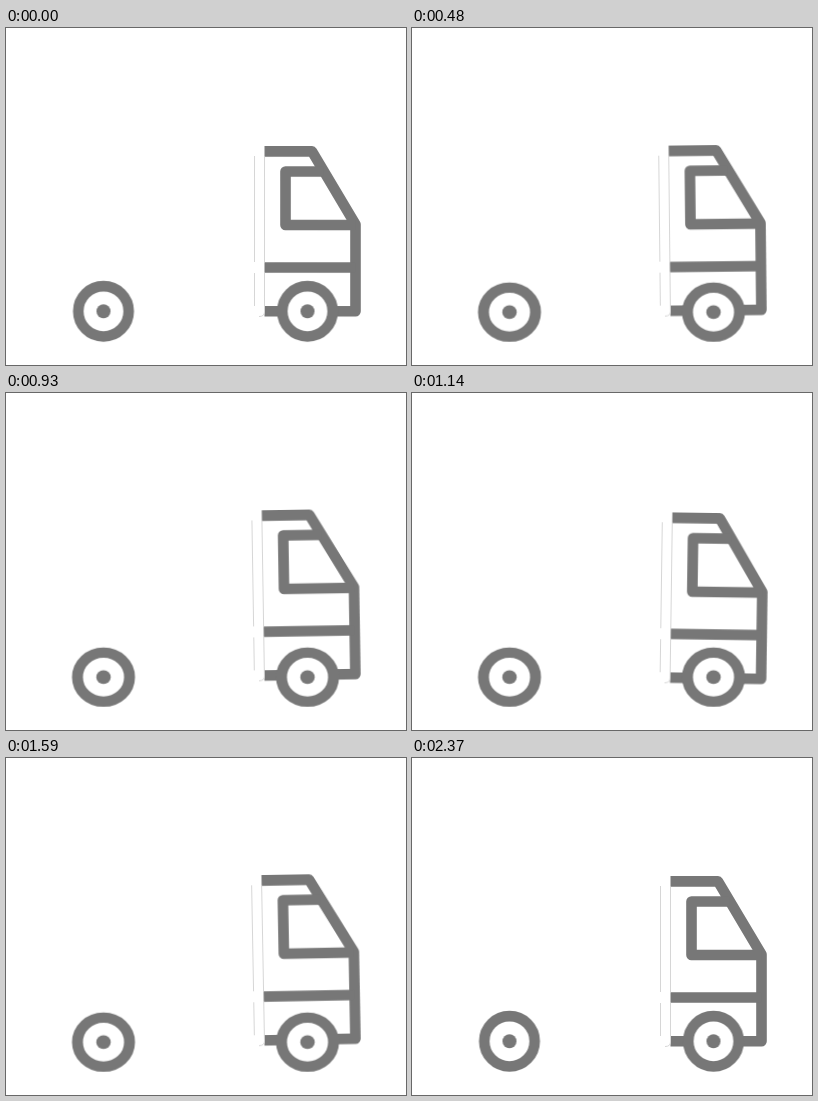
An HTML page without scripts for the animation above (4460 ms loop, 400 px wide and 337 px high).

```html
<!DOCTYPE html>
<html lang="en">
<head>
<meta charset="utf-8">
<title>Truck</title>
<style>
  html, body { margin: 0; width: 100%; height: 100%; overflow: hidden; background: #fff; }
  svg { display: block; width: 100%; height: 100%; }
  .line { fill: none; stroke: #777; stroke-width: 10.6; stroke-linejoin: round; }
  .edge { fill: none; stroke: #d6d6d6; stroke-width: 1; }
  .ring { fill: #fff; stroke: #777; stroke-width: 10.6; }
  .hub { fill: #777; }
  .road { stroke: #fff; stroke-width: 9.9; stroke-linecap: round; }

  .cab, .wheel, .road { animation: 4460ms linear infinite; }
  .cab { animation-name: rock; transform-origin: 210px 262px; }
  .wheel { animation-name: squash; transform-origin: 0 314px; }
  .road { animation-name: pass; }

  @keyframes rock {
    0%, 53.13%, 100% { transform: none; }
    2.02%, 25.56% { transform: translate(-.1px, .7px) rotate(.8deg); }
    4.04%, 7.4%, 27.58%, 30.94% { transform: translate(-.1px, 1px) rotate(1.15deg); }
    9.42%, 23.54%, 32.96% { transform: translate(-.2px, .2px) rotate(0deg); }
    11.66%, 35.2% { transform: translate(-.4px, 0) rotate(-1deg); }
    13.45%, 20.18%, 37%, 43.05% { transform: translate(-.5px, 0) rotate(-1.15deg); }
    45.07% { transform: translate(-.3px, 0) rotate(-.75deg); }
    48.2% { transform: translate(-.1px, 0) rotate(-.18deg); }
  }
  @keyframes squash {
    0%, 53.13%, 100% { transform: none; }
    2.02%, 46.2% { transform: scale(1.033, .972); }
    48.2% { transform: scale(1.012, .99); }
  }
  @keyframes pass {
    0%, 26.9% { transform: none; }
    13.45%, 40.36% { transform: translateX(-990px); animation-timing-function: step-end; }
    53.13%, 100% { transform: none; }
  }
</style>
</head>
<body>
<svg viewBox="0 0 400 337" preserveAspectRatio="none">
  <g class="cab">
    <path class="line" d="M258.5 123.4H306L349.5 196.5V283.3H258.5"/>
    <path class="line" d="M317.5 143.5H279.5V197H349.5M258.5 239.5H349.5"/>
    <path class="edge" d="M248.5 128V234M248.5 245V278M258.5 129V234M258.5 245V284Q258.5 288.5 253 288.5"/>
  </g>
  <g transform="translate(97.5)">
    <g class="wheel">
      <circle class="ring" cy="283.3" r="25.2"/>
      <circle class="hub" cy="283.3" r="7"/>
    </g>
  </g>
  <g transform="translate(301.5)">
    <g class="wheel">
      <circle class="ring" cy="283.3" r="25.2"/>
      <circle class="hub" cy="283.3" r="7"/>
    </g>
  </g>
  <path class="road" d="M346 309.1H692"/>
</svg>
</body>
</html>
```
